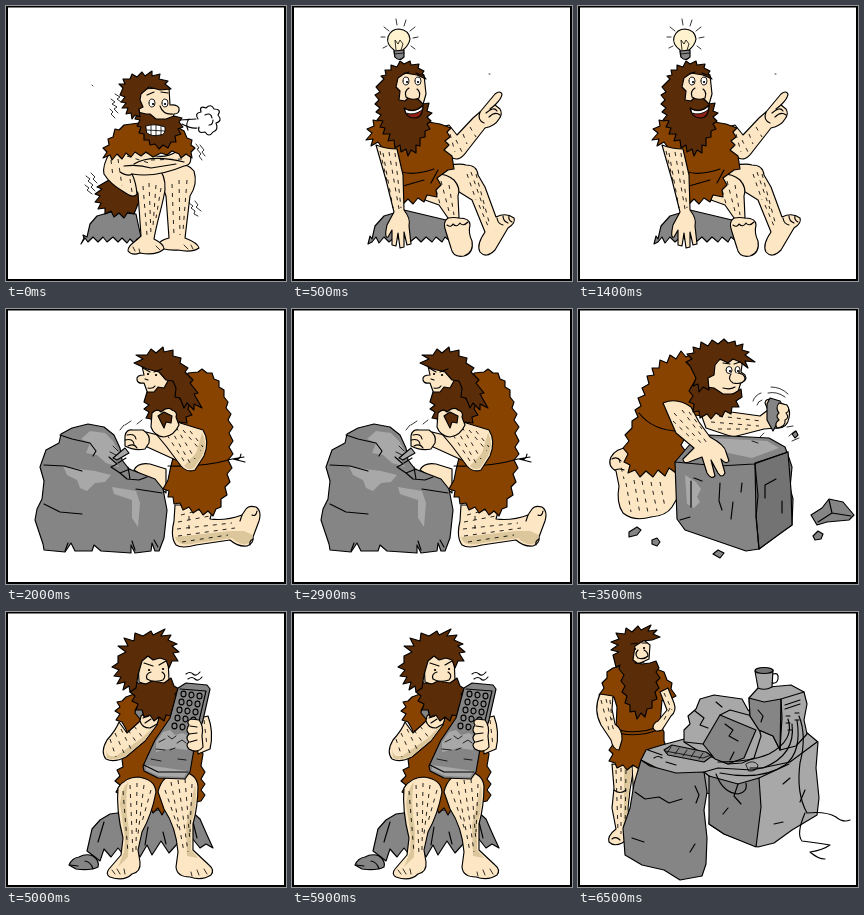
Write an HTML page without scripts that moves like this. It is 280 px wide and 275 px high and loops after 8000 ms.

```html
<!DOCTYPE html>
<html lang="en">
<head>
<meta charset="utf-8">
<title>Stone age idea</title>
<style>
html,body{margin:0;width:100%;height:100%;overflow:hidden;background:#fff}
svg{display:block;width:100%;height:100%}
path,ellipse{stroke:#000;stroke-width:1.15;stroke-linejoin:round;stroke-linecap:round}
.k{fill:#fde6c4}
.c{fill:#dcc79c;stroke:none}
.h{fill:#5a2c08}
.f{fill:#884300}
.g{fill:#858585}
.m{fill:#737373}
.p{fill:#a8a8a8}
.n{stroke:none}
.w{fill:#fff;stroke-width:.9}
.b{stroke-width:2.2}
.l{fill:none}
.t{fill:none;stroke-width:.8}
/* body hair: short broken strokes along a limb */
.d{fill:none;stroke-width:.85;stroke-dasharray:4 5;stroke-linecap:butt}
.s{visibility:hidden;animation:show 8s step-end infinite}
.s0{animation-name:first}
.s1{animation-delay:-7.5s}
.s2{animation-delay:-6s}
.s3{animation-delay:-4.5s}
.s4{animation-delay:-3s}
.s5{animation-delay:-1.5s}
@keyframes first{0%{visibility:visible}6.25%,100%{visibility:hidden}}
@keyframes show{0%{visibility:visible}18.75%,100%{visibility:hidden}}
</style>
</head>
<body>
<svg viewBox="0 0 280 275" preserveAspectRatio="none">
<rect width="280" height="275" fill="#fff"/>

<!-- shivering -->
<g class="s s0">
<path class="g" d="M75 238l3-6-1-3 4 2 3-13 7-8 14-4 25 2 6 28-5-3-2 5-5-5-3 4-5-5-4 4-5-5-6 5-4-5-5 5-5-5-5 5-3-4z"/>
<path class="h" d="M103 174L91 181l5 2-7 5 5 2-5 6 6 1-3 6 7-1 0 6 6-3 3 6 5-4 5 5 4-6 6 2 8-20-6-22z"/>
<path class="k" d="M150 162Q178 152 188 165Q192 178 184 190L179 232Q192 237 193 242Q186 247 172 244Q156 245 152 239Q154 234 163 232L160 190z"/>
<path class="k" d="M128 160C120 170 126 180 132 187L135 230C128 237 122 239 122 245Q126 250 134 247Q150 250 158 243Q158 238 148 233C151 215 157 198 159 184Q160 168 150 160z"/>
<path class="d" d="M137 180L141 229M143 177L145 229M150 179L147 220M155 182L150 212M166 178L168 230M173 174L174 229M181 174L177 225"/>
<path class="t" d="M127 241l2 4M133 243l1 4M150 240l4 4M178 239l4 4M185 239l2 4"/>
<path class="k" d="M104 146Q96 160 98 168Q104 178 118 186Q128 193 131 188Q130 176 126 168Q150 172 178 160Q187 159 184 148L172 145Q160 152 150 150Q125 140 104 146z"/>
<path class="l" d="M118 160Q132 158 145 162L170 158M128 158Q145 148 178 156M114 166Q122 171 126 168"/>
<path class="d" d="M105 154L107 171M112 153L116 180M121 150L143 157M124 173L126 186M145 154L176 153"/>
<path class="f" d="M133 117L118 119l-5 5-4-1-2 8-5 2 1 6-6 3 4 4-4 6 7-3 2 5 5-6 5 5 4-6 5 4 4-5 6 4 5-4 7 5 8-4 6 2 5-4 7 3 2 4 5-4 6 4-1-6 4-4-4-3 1-5-5-2-3-7-7-4z"/>
<path class="k" d="M131 83L134 116L145 122L166 117L168 108Q174 108 173 102Q171 98 164 99L163 82z"/>
<path class="w" d="M143 97a3 4 0 1 1 6 0a3 4 0 1 1-6 0M156 97a3 4 0 1 1 6 0a3 4 0 1 1-6 0"/>
<path class="b" d="M147 98h.1M159 98h.1"/>
<path class="l" d="M141 89l7-3M155 86l7 1M154 100Q157 109 167 108"/>
<path class="h" d="M132 106l-3 7 5 1-3 6 4 1-2 6 5 1 0 6 5 0 1 5 5-1 4 5 4-4 5 3 3-6 5 0-1-6 6-2-3-5 5-2-4-5 3-4-8-2-8 3-10 0-6-5-4 0z"/>
<path class="w" d="M140 120Q149 117 159 121Q160 129 154 129Q146 131 141 127z"/>
<path class="t" d="M141 124L159 125M145 119L145 129M150 119L150 130M155 120L155 129"/>
<path class="h" d="M117 82l-4-4 6 0-2-5 7 0 2-5 5 3 5-5 3 4 7-5 0 5 8-2-1 5 9 2-3 3 6 5-11 1-11-3-8 7-1 6 3 7-4 2 1 8-5-2-3 4-1-6-5 1 2-6-6 0 4-5-5-1 4-5-5-2z"/>
<path class="l" d="M174 114L190 113M176 118Q185 123 191 122M183 113Q179 118 182 124M192 113Q188 107 195 106Q193 99 200 102Q205 97 208 103Q216 103 212 109Q217 115 210 117Q213 124 207 126Q203 132 199 126Q191 128 193 121M199 109Q205 106 206 112M203 119Q207 119 207 114"/>
<path class="t" d="M105 93l4 3-3 2 5 3-3 2 4 4M109 88l5 3-3 2 4 3M104 103l3 3-2 2 4 4M80 170l4 3-2 2 5 4-2 2 4 4M85 167l4 4-2 2 4 4M79 179l4 3-2 2 5 4M190 138l3 4-2 1 4 5-2 2 3 4M194 139l4 5-2 2 3 4M183 197l4 3-2 2 4 3-1 3 4 2M189 195l3 4-2 2 5 4M86 79l1 1"/>
</g>

<!-- idea -->
<g class="s s1">
<path class="g" d="M76 238l2-8 2 3 3-13 9-10 20-6 42 10 4 21-5-4-3 5-6-5-4 5-6-5-5 5-5-5-6 5-5-5-5 4-4-5-7 6-5-5-5 6-3-6-4 5z"/>
<path class="k" d="M143 123L157 119L165 129L181 112L188 106L203 88Q208 84 210 88Q210 92 203 99L208 103Q211 108 207 113Q203 120 193 122L175 145Q167 157 159 151L146 141z"/>
<path class="l" d="M188 106Q185 114 192 117M194 107Q202 100 205 105M197 111Q203 105 208 109M203 99l-5 4"/>
<path class="d" d="M158 128L163 146M164 134L170 146M171 128L175 138M178 121L184 131"/>
<path class="k" d="M137 164Q165 156 174 159Q185 159 186 169L193 181L204 211Q214 206 222 212Q224 217 216 222L203 244Q194 253 188 246Q184 239 193 226L180 194L164 184z"/>
<path class="k" d="M130 170Q150 164 162 174Q169 182 166 190L167 212Q178 212 178 219Q176 227 180 235Q182 247 172 250Q161 252 159 242L154 226Q150 216 156 212L147 199L133 194z"/>
<path class="l" d="M156 212Q162 211 167 212M155 219q4 3 6-1q4 4 7-1q3 4 8-1M205 212q1 6 6 7M211 210q0 5 5 7M217 210q-1 4 3 6"/>
<path class="d" d="M142 176L148 198M149 175L158 209M157 179L162 209M175 168L184 194M179 166L192 203M184 168L197 216M187 199L196 220"/>
<path class="f" d="M90 108l-4 7-5-1 1 6-7 3 5 4-6 7 7-1-2 7 7-4 5 7 4 1 0 12 6 24-3 6 6 1-2 6 7-2 2 7 5-5 5 5 5-6 6 4 3-7 10 2-1-7 5-5-4-7 11-8 6-1-2-13-8-6 5-5-4-4 5-4-3-5 4-4-11-4z"/>
<path class="l" d="M101 160Q112 173 142 163M111 180L132 174M146 164L139 177"/>
<path class="k" d="M84 139Q94 143 105 143L111 169L112 204Q119 213 117 220L119 238L115 239L112 226L112 241L108 242L106 227L104 240L100 239L100 224L96 231Q92 233 95 219L102 206L94 174z"/>
<path class="d" d="M91 147L101 202M97 146L107 203M103 147L109 202M88 145L95 175"/>
<path class="k" d="M103 65L103 96L130 102L134 88L132 69Q119 59 103 65z"/>
<path class="h" d="M92 73l-3-3 5-1-1-5 6 0 0-5 6 2 3-6 4 3 6-3 1 4 8-1-1 4 6 3-2 3 4 5-9-4-12-2-7 5-2 9 4 4-1 9 6 1 4-4 9 2 5 5 6-1-2 8 5 2-5 4 4 4-4 3 3 5-5 2 0 6-5 1 0 8-4-1 0 8-5-3-3 6-2-7-5 3-1-7-5 3-1-8-6 1 2-7-7 0 2-6-5-1 3-6-6-1 4-5-5-3 4-4-5-4 4-4-4-5 5-3-4-5z"/>
<path class="w" d="M111 75a3 4 0 1 1 6 0a3 4 0 1 1-6 0M123 75a3 4 0 1 1 6 0a3 4 0 1 1-6 0"/>
<path class="b" d="M115 76h.1M126 76h.1"/>
<path class="k" d="M117 82Q112 85 114 91Q120 95 127 92Q129 86 125 83"/>
<path class="l" d="M112 68l5-2M124 67l5 2"/>
<path fill="#8e2115" d="M112 102Q122 108 131 99Q131 112 122 112Q114 112 112 102z"/>
<path class="w" d="M113 103Q122 108 131 100L130 104Q122 110 114 107z"/>
<path fill="#fff3cf" d="M102 44Q94 38 96 31Q99 23 107 23Q117 24 118 33Q117 39 111 44L111 51L103 51z"/>
<path class="g" d="M102 45L112 44L112 51Q107 56 103 51z"/>
<path class="t" d="M102 48l10-1M104 44L103 34L106 38L108 34L111 38L109 44M92 21l5 4M104 13l1 6M114 14l-2 6M123 21l-5 4M89 31h4M121 32l5-1M91 42l4-2M119 40l4 3M197 68h1"/>
</g>

<!-- chipping the boulder -->
<g class="s s2">
<path class="k" d="M128 161Q132 153 144 155L160 160L160 184L146 172z"/>
<path class="k" d="M169 196L168 212Q164 228 170 236Q176 240 190 236L224 231Q232 238 241 237Q248 234 247 228L253 212Q256 202 250 198Q243 196 240 200L236 206Q220 212 204 210L208 196z"/>
<path class="c" d="M169 228L224 222L238 222L247 226Q246 235 240 235Q233 236 226 229L190 234Q172 239 169 228z"/>
<path class="d" d="M175 206L198 200M172 213L204 207M171 220L226 214M172 227L229 219M176 233L222 226M183 207L183 222"/>
<path class="l" d="M236 206l-2 6M246 206q4 2 5-4M244 236q-1-4 3-6"/>
<path class="g" d="M38 241l-1-6-8-24 2-11 5-10 2-18-4-14 6-17 13-7 2-9 11-6 16-4 16 3 10 8 6 13 2 12 7 9 26 10 8 10 4 21-3 28-5 13-4 0-3-8-1 8-16 2-4-8 0 8-30-2-7-6-2 6-17 0-4-8-6 9z"/>
<path class="p n" d="M84 122l15 2 8 8 6 11-4 8 4 7-13-4-9-8-11-2 4-10-9-4zM57 157l16 3 16 2 16 4-6 7-10 1-8 8-7-3-3-8-10-5zM106 178l24 4 4 12-2 24-6-9 0-18-18-6z"/>
<path class="l" d="M54 126L66 130L84 134M38 156L58 157L76 162M103 148L111 155L105 158L114 164L124 160M112 154l8-5M114 164l7 6 12 1 8-3M122 158l2 12M38 195l16 8 22 2M130 180l26 4M84 134l6 8-3 5M62 234l-3 8M126 232l3 9M148 231l4 7"/>
<path class="f" d="M182 64l10-1 4-3 5 4 5 0 2 6 5 2 0 6 5 3 0 7 4 5-2 6 5 6-3 6 5 7-4 6 4 8-4 6 4 7-5 6 4 8-5 6 3 8-5 5 2 8-6 4 0 8-5 2-3 7-5-5-5 4-4-6-6 4-4-6-6 3-3-7-6 1-1-7-5 0 1-6-6-2 5-9 2-10 3-12 0-20 8-30z"/>
<path class="l" d="M162 157Q200 158 226 150L238 148M227 150L239 153M228 150q6 2 7-5"/>
<path class="k" d="M140 123L164 129L176 140L172 152L139 137z"/>
<path class="k" d="M145 108L150 101L171 113L197 121Q204 132 198 147L189 161Q181 164 175 157L160 137L150 125z"/>
<path class="c" d="M196 124Q202 134 196 147L188 159Q182 162 178 157L190 144z"/>
<path class="d" d="M164 119L184 154M170 118L189 150M177 121L195 142M161 126L178 152M184 122L197 138"/>
<path class="k" d="M136 57L138 66Q130 66 131 71Q132 75 138 74L142 85L162 87L168 62L158 52z"/>
<path class="h" d="M141 83l7 0 4-5 6 1 5-9 6 0 5 20 10 4-2 6 4 6-6 2 1 6-8-1-3 5-6-4-6 4-4-4-7 2-2-6-5-1 3-6-5-3 5-4-5-3z"/>
<path class="h" d="M128 54l9-4-7-4 11 0 4-6 5 4 7-6 1 5 9-2 0 6 8 2-1 5 8 5-3 4 8 8-3 3 8 10-4 1 8 14-8-4 0 6-7-7-3 5-4-10-5-1 1-9-3-7-7-1-7-8-12-3z"/>
<path class="b" d="M142 65h.1M150 66h.1"/>
<path class="l" d="M137 59l7 4M148 63l8-3M142 79Q147 80 149 77M139 70l3 1"/>
<path class="k" d="M146 104Q151 99 155 103Q162 97 166 101Q172 103 170 108L173 116Q168 127 158 128Q148 127 145 118z"/>
<path class="h" d="M152 107l6-4 8 4-1 7-5-1-2 6z"/>
<path class="k" d="M119 127Q120 120 127 121L137 121Q145 126 143 134L139 140Q128 142 119 137z"/>
<path class="l" d="M121 126Q129 124 130 130M119 131Q127 129 128 135M122 137Q128 134 131 139"/>
<path class="p" d="M107 149L119 139L123 144L111 151z"/>
<path class="t" d="M107 137l5 5M104 143l6 3M114 121l4-5M119 116l6-4M131 115l5-4"/>
</g>

<!-- carving the block -->
<g class="s s3">
<path class="k" d="M50 139Q38 139 33 148Q29 157 38 162L41 177Q38 194 45 204Q56 213 73 208Q88 207 94 198L107 176L96 154z"/>
<path class="d" d="M48 174L53 203M56 171L62 205M64 172L70 204M73 173L79 202M82 173L87 198M41 150L46 170"/>
<path class="l" d="M34 150q5-3 9 2M37 161q5-2 9 0"/>
<path class="f" d="M76 66l-2-7 7 0 1-8 7 3 3-8 6 4 5-8 5 6 7-4 4 6 7-2 0 11 7 11-2 15-4 13-5 3 2 6-7-1-2 8-4-3-6 6 2 12-4 7 5 7-5 6 3 8-7-1-1 8-7-5-4 8-7-6-5 7-7-6-6 6-5-7-7 3 2-8-6-3 4-8-5-6 6-7-4-6 7-7 0-7 6-4-3-7 6-4-3-8 7-3-3-7 7-4-2-8z"/>
<path class="l" d="M61 104Q75 122 102 122"/>
<path class="k" d="M119 94L153 103L182 107L190 101L187 94Q188 89 193 91L208 96Q213 101 211 109Q209 120 198 119L186 120L155 128L128 119z"/>
<path class="d" d="M132 106L183 112M133 113L181 117M140 120L170 120"/>
<path class="g" d="M97 153L113 134L131 126L191 129L207 138L211 149L214 158L212 179L215 190L214 216L201 225L181 240L168 242L107 221L99 210z"/>
<path class="p n" d="M117 137l16-8 56 3 12 7-27 10zM107 166l11 7 5 7-4 8 3 5-6 6-7-4z"/>
<path class="m" d="M177 154L210 143L213 181L214 216L181 240L178 205z"/>
<path class="l" d="M97 153L141 157L176 155L210 143M177 155L180 187L178 208L181 240M113 172v26M116 169l8 3M142 174l-1 18 3 9M155 193l-2 17M164 174l-1 9M198 170l-11 6v13M204 192v12M102 211l10-3"/>
<path class="k" d="M85 94Q99 88 113 98L121 113L132 128Q147 136 148 143L151 152Q148 156 143 150L147 164Q144 170 140 164L133 151L137 167Q133 171 129 164L124 148L111 153Q105 155 105 150L116 139L98 124z"/>
<path class="d" d="M96 104L124 135M104 101L129 134M111 103L124 120M95 112L115 131"/>
<path class="k" d="M126 52L122 77L140 90L160 83L163 73Q170 72 167 66L163 63L165 49z"/>
<path class="h" d="M118 70l4 9 7-1 7 1 9 6 10 0 8-5 1 8-6 4 3 6-7 0-1 7-6-3-3 6-6-4-5 6-4-5-7 4-1-7-6 1 1-8-5-2 4-6-4-5z"/>
<path class="h" d="M112 57l-4-4 6-3-5-5 7-1-1-6 7 2 1-7 7 4 4-6 6 4 6-5 4 4 7-2 1 5 7-2-1 6 7 2-4 3 10 7-10-1 3 7-8-6-7-3-5 4-8-4-5 6-1 10-6 3 1 12-6-3-4 5-1-8-5 2 3-8z"/>
<path class="w" d="M148 61a3 3.500 0 1 1 6 0a3 3.500 0 1 1-6 0M157 61a2.500 3.500 0 1 1 5 0a2.500 3.500 0 1 1-5 0"/>
<path class="b" d="M152 62h.1M160 62h.1"/>
<path class="k" d="M153 65Q149 70 155 74Q165 76 167 70Q167 65 160 64"/>
<path class="l" d="M145 54l7 1M156 55l6-2M145 79q7 2 12-1"/>
<path class="g" d="M189 95L192 89L202 92L205 97L201 111L195 122L189 111z"/>
<path class="k" d="M201 94L209 96Q213 102 208 104Q212 109 207 111Q208 118 199 119Q196 114 201 111Q197 107 201 104Q197 99 201 94z"/>
<path class="t" d="M190 84q9-2 17 4M193 78q10 0 17 7M175 92q2-6 8-8M179 96q1-4 5-5M182 128l4-4M211 127l6-5M214 132l7-3M180 134l-6-2M209 118l6-1"/>
<path class="g" d="M233 206L244 199L251 190L265 193L276 206L271 211L249 213L239 216z"/>
<path class="l" d="M251 191L254 204L273 207M254 204L240 213"/>
<path class="g" d="M51 223l8-5 4 3-4 5-8 2zM74 231l5-2 3 4-3 4-5-2zM135 245l5-4 6 3-4 5zM235 227l5-5 5 3-2 5-6 1zM214 125l4-3 2 4-3 3z"/>
</g>

<!-- keyboard -->
<g class="s s4">
<path class="g" d="M81 239l5-22 8-9 10-6 30-4 50 0 10 9 7 16 6 13-7-4-6 4-8-10-4 14-10-9-9 10-8-12-9 14-5-10-7 12-6-10-8 11-8-10-7 9-7-8-4 12-5-4z"/>
<path class="l" d="M98 210l-6 20M186 206l5 20M142 215l-3 18M157 220l3 12"/>
<path class="f" d="M128 82l-8 3-4 4-5 1 3 5-5 4 5 3-4 6 6 2 4 7 4 20-8 10 1 8-6 3 3 6-5 5 5 4-4 7 5 3-2 6 30 4 4 8 5-5 4 7 4-7 5 3 10-6 20-4 4-6-4-5 4-6-4-5 4-7-4-6 2-12-20-50z"/>
<path class="k" d="M112 176Q119 165 132 165Q149 167 150 180Q146 202 136 220L132 238L134 250Q135 260 126 262Q118 270 104 265Q99 262 103 257L115 243L117 226Q110 198 112 176z"/>
<path class="k" d="M152 180Q156 162 174 160Q190 160 192 174Q192 194 187 212L187 238L203 253Q209 258 205 263Q196 269 184 265Q171 265 170 255L172 240Q170 215 158 197z"/>
<path class="c" d="M114 192Q116 176 122 170Q118 190 123 218L122 245L112 255L118 240L119 226zM189 172Q192 192 185 212L185 238L192 246L181 244L180 214z"/>
<path class="d" d="M117 179L122 241M124 173L127 243M131 171L130 238M138 173L132 222M145 178L136 210M159 178L173 218M165 170L178 240M172 168L182 240M179 167L184 230M186 172L184 220"/>
<path class="t" d="M106 258l3 4M111 257l3 5M118 257l1 5M185 260l1 4M191 258l2 5M198 257l3 5"/>
<path class="k" d="M190 107L202 104Q208 120 204 137L192 142z"/>
<path class="k" d="M113 110Q110 118 101 128Q94 140 100 147Q108 151 120 145L139 129L151 113L153 103Q150 96 144 98L135 104L134 109L121 121z"/>
<path class="c" d="M100 137Q101 146 110 144L136 126L150 112L139 128L120 144Q108 149 101 146z"/>
<path class="d" d="M104 127L110 145M109 121L118 141M115 117L125 137M122 118L131 131M128 114L137 126M198 108L201 134"/>
<path class="g" d="M129 101Q129 94 136 92Q145 92 148 99L145 106L134 107z"/>
<path class="k" d="M135 104Q140 99 144 102L150 99Q155 104 151 112L144 116Q136 116 134 109z"/>
<path class="l" d="M137 106l6-2M139 111l6-4"/>
<path class="k" d="M132 49L133 70L152 76L163 68L162 46L146 40z"/>
<path class="h" d="M126 64l6 7 8 1 6-3 12 2 7-5 3 8 5 3-4 5 5 5-5 4 3 6-6 1 0 6-6-1-2 6-5-4-5 4-4-6-6 2-2-7-6 0 2-6-6-3 3-5-5-4 4-5z"/>
<path class="h" d="M112 44l8-4-8-6 10 0-4-8 10 3 1-8 8 3 8-5 2 4 12-6-4 7 10-1-3 5 9 4-5 2 7 6-6 1 5 8-6 0-3 7-3-8-6-2-7 2-5-4-6 5-4 14-2 13-6 4-1-6-6 4 2-8-8 2 4-7-7-1 5-6-7-3 6-4z"/>
<path class="b" d="M143 58h.1M157 57h.1"/>
<path class="k" d="M145 60Q139 62 141 67Q147 71 157 68Q161 63 156 60"/>
<path class="l" d="M138 51l9 3M153 53l7-4"/>
<path class="g" d="M172 76L180 71L201 73L204 77L197 108L188 137L184 160L179 167L152 166L138 159L137 154L149 128L164 106z"/>
<path class="p n" d="M150 130l7-10 7-2 5 5 8-2 7 4-3 13-15-2-16 4zM140 153l42 6-4 6-25-1-13-6z"/>
<path class="l" d="M138 153L152 160L182 160M174 77L200 79L190 122"/>
<g class="t"><path id="keys" d="M175 82a2.400 2.700 0 1 1 5 0a2.400 2.700 0 1 1-5 0M183 83a2.400 2.700 0 1 1 5 0a2.400 2.700 0 1 1-5 0M191 84a2.400 2.700 0 1 1 5 0a2.400 2.700 0 1 1-5 0"/>
<use href="#keys" x="-2" y="8"/><use href="#keys" x="-4" y="16"/><use href="#keys" x="-6" y="24"/><use href="#keys" x="-9" y="32"/></g>
<path class="t" d="M153 130l6-3M162 124l4 3 4-3M171 131l5-3 4 3M150 137l9 1M164 138l5-2M145 147l10 2M172 147l8 1"/>
<path class="k" d="M183 113Q180 109 185 107L193 108Q198 114 196 124L197 135Q191 142 183 137Q179 133 183 130Q179 126 183 122Q179 118 183 113z"/>
<path class="l" d="M184 114l7 1M183 122l8-1M184 130l7-2"/>
<path class="l" d="M180 62q4-3 7 0t7-2M182 67q4-3 7 0t7-2"/>
<path class="g" d="M63 253Q66 246 73 245Q80 241 87 244Q94 249 92 255Q84 259 70 257z"/>
<path class="l" d="M79 249Q85 250 87 257M64 253l8 1"/>
</g>

<!-- stone computer -->
<g class="s s5">
<path class="k" d="M34 152L36 176L34 196L38 217Q29 224 31 230Q36 235 44 231L52 226L50 196L52 178L56 154z"/>
<path class="k" d="M54 154L56 190L68 176L72 152z"/>
<path class="c" d="M46 156L54 156L51 178L49 196L51 224L45 228L46 190z"/>
<path class="d" d="M38 158L40 220M43 156L43 222M48 158L47 218M60 158L60 180"/>
<path class="l" d="M36 178q6 5 12 0M34 227q4-3 8 1"/>
<path class="f" d="M43 54l-8 2-6 4 0 6-5 5 2 5-5 7 6 0 3 5 6-3 3 10-1 22-5 8 3 6-5 7 4 4-4 7 6 2 2 5 6-3 4 5 6-5 6 4 5-5 7 3 4-5 8 0 0-7 4-6-3-8 0-9-4-8 2-24 5 3 5-5 4-2-5-7 1-6-5-3-3-8-10-4z"/>
<path class="l" d="M37 117Q60 124 85 113M37 120Q60 127 85 116"/>
<path class="k" d="M22 82L35 84L34 97L37 112Q45 118 44 128L41 138Q35 138 33 128L23 113Q15 98 22 82z"/>
<path class="k" d="M82 80L90 76L96 91Q99 99 93 104L84 118Q77 121 75 116Q75 111 80 109L89 98z"/>
<path class="d" d="M23 88L31 118M28 87L36 120M32 88L34 108M86 81L94 98M92 96L84 112"/>
<path class="k" d="M46 31L46 49L58 53L71 47L72 33L62 25z"/>
<path class="h" d="M35 43l6-3-8-2 7-5-7-3 8-3-3-6 9 1 1-6 6 4 6-6 3 4 10-5-3 6 9-1-4 4 7 3-8 3-9 1-8 5-2 14 4 3 5 1 8-1 6-2 3 7-3 4 4 6-4 4 3 6-4 4 2 7-5 2 0 7-5 1-2 8-4-4-4 6-2-8-5 1 0-7-5-2 2-7-5-4 3-6-4-5 3-6-5-6 1-4-4 2z"/>
<path class="b" d="M57 37h.1M66 36h.1"/>
<path class="k" d="M60 38Q56 42 60 46Q66 48 70 44Q70 40 66 38"/>
<path class="l" d="M53 32l6-1M64 31l5 0M57 51q5 1 9-1"/>
<path class="p" d="M63 148L68 138L84 133L110 126L190 118L228 120L240 130L238 156L241 186L239 203L214 218L196 231L180 235L146 222L131 212L133 182L128 181z"/>
<path class="g" d="M131 164L160 172L181 166L183 195L178 235L146 222L131 212z"/>
<path class="g" d="M63 148L72 154L98 161L126 160L129 180L126 198L129 226L128 252L124 264L102 268L86 258L64 253L47 243L45 216L52 196L56 172z"/>
<path class="l" d="M131 164L126 160L140 156L174 158L212 150L239 130M181 166L211 152M57 180l10 7 14-2 10 6 13-4M54 226l12 4M117 174l4 9-3 8M112 240l5-8M160 172l-4 12 7 8M150 196l-5 6M205 172l7-6M222 190l5-12M196 212l9-2M70 138l14 5M88 150l10 3M76 146q4-3 8 0"/>
<path class="p" d="M106 130L106 118L112 112L110 104L118 97L122 87L136 83L164 87L170 98L178 105L183 124L176 146L164 151L150 152L122 140z"/>
<path class="g" d="M125 132L142 103L178 118L166 146L150 152L137 147z"/>
<path class="l" d="M142 103L152 98L178 105M117 99l9 7-4 7 8 3M147 112l8 6-4 6 9 5M152 148l4-8M107 130l18 2M138 90l6 5"/>
<path class="p" d="M171 86L180 76L213 73L226 80L229 92L226 108L229 122L218 134L202 138L195 124L181 118L172 104z"/>
<path class="g" d="M171 86L186 90L203 87L204 106L202 138L195 124L181 118L172 104z"/>
<path class="l" d="M203 87L226 80M203 87L202 138M207 93l15-5M207 97l15-5M180 98l5 6-2 6M208 104h4M217 101h4M208 111h4M217 108h4M210 118h4"/>
<path class="p" d="M177 59L195 58L194 75Q187 79 180 76z"/>
<ellipse class="m" cx="186" cy="58.500" rx="9" ry="3"/>
<path class="l" d="M195 62Q201 60 200 67Q199 72 194 71"/>
<path class="g" d="M86 138l8-5 34 7 6 4-8 6-36-7z"/>
<path class="t" d="M87 139l38 7 8-3M93 135l-4 6M101 136l-4 6M109 138l-4 6M117 139l-4 6M125 141l-4 6M168 152q7-5 12 1q-1 7-9 6z"/>
<path class="l" d="M210 107Q217 128 191 142Q172 150 140 150M214 112Q218 143 185 156L172 156M219 108Q224 140 207 153Q183 169 142 161M221 104Q229 124 222 151Q218 181 229 201Q248 199 258 205Q265 211 272 208M227 201Q218 222 224 229Q240 231 252 233Q245 238 232 240Q240 247 247 247M138 162Q145 181 160 182Q170 180 168 171"/>
</g>

<path d="M0 0H280V275H0zM2 1.500V273H278V1.500z" fill="#000" fill-rule="evenodd" style="stroke:none"/>
</svg>
</body>
</html>
```
